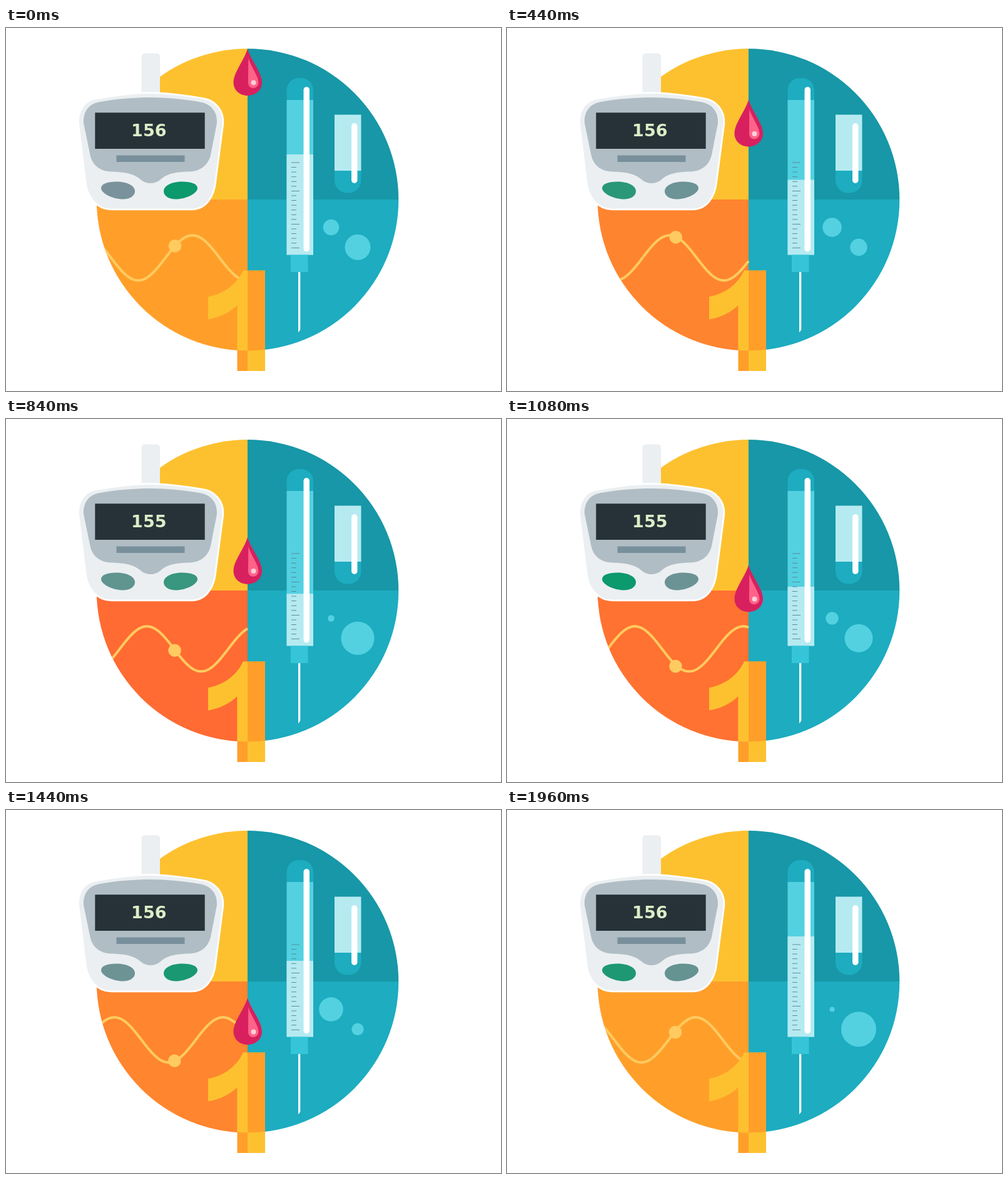
Recreate the animation shown at these times as an HTML page with a canvas. Size 791 by 580 pixels, loop 2000 ms.

```html
<!DOCTYPE html>
<html lang="en">
<head>
<meta charset="utf-8">
<title>Glucose meter</title>
<style>
  html, body { margin: 0; width: 100%; height: 100%; overflow: hidden; background: #fff; }
  canvas { display: block; }
</style>
</head>
<body>
<canvas id="stage" width="791" height="580"></canvas>
<script>
const ctx = document.getElementById('stage').getContext('2d');
const LOOP = 2000, STEP = 40;
const CX = 386, CY = 274.3, R = 241.3;
const YELLOW = '#fdc130', ORANGE = '#ff9f2a', TEAL = '#1797a7', CYAN = '#1dacc0',
      SKY = '#53d1e1', ICE = '#b5eaf1', SHELL = '#ebeff2', GOLD = '#ffcb60';

// Flat lists of time, value pairs
const SMALL = [0, 12.8, 260, 19.8, 600, 11.3, 880, 4.2, 1080, 10.3, 1440, 19.3, 1560, 22.3, 1680, 16.8, 1960, 4];
const BIG = [0, 20.5, 260, 8.6, 600, 18.2, 880, 28, 1080, 22.5, 1440, 9.7, 1560, 5.5, 1680, 11, 1960, 28];
const LEFT_GREEN = [0, 0, 320, 1, 760, 0, 1080, 1, 1490, 0, 1880, 1, 1960, 0.85];
const RIGHT_GREEN = [0, 1, 400, 0, 720, 1, 1015, 0, 1500, 1, 1680, 0.62, 1960, 0.2];
const DOT_SHIFT = [0, 0, 240, 1.5, 600, 0, 1080, 2.3, 1440, -0.5, 1680, 1.2, 1960, 1.5];
const SWING = [0, 0, 880, 1, 1960, 0];
const TOGGLES = [120, 420, 840, 1260, 1560, 1820];

const BODY = new Path2D('M142 114.5C170 110 200 104.8 232 104.8C265 105.5 290 110 313 113.5C334 116 347 133 345.5 153L333.5 245C331 270 318 288 297 288.5L168 288.5C147 288.5 131 270 128.5 247L117 153C116 132 126 118 142 114.5Z');
const FACE = new Path2D('M150 118C178 113 205 111 231 111C258 111 285 114 309 118C328 121 338 134 337 152L327 203C323 219 311 229 293 229.5C270 230 257 233 247 242C238 250 224 250 215 242C205 233 190 230 168 229.5C150 229 138 219 134.5 203L124 152C123 134 132 121 150 118Z');
const BUTTON = new Path2D('M152 256C152 249 162 245.5 176 245.5C194 245.5 206 252 206 261C206 268 198 273.5 187 273.5C170 273.5 152 264 152 256Z');
const ONE = new Path2D('M379 387.5H414V548H369.5V443C357 455 340 463 323 465.5V429.5C353 424 371 405 379 387.5Z');
const DROP = new Path2D('M386 0C381 18 363.5 38 363.5 54C363.5 66 373 75 386 75C399 75 409 66 409 54C409 38 391 18 386 0Z');
const SHINE = new Path2D('M387.3 15C391 28 403.5 44 403.5 54C403.5 60 399 63 394.5 63C390 63 387 59 387 54Z');
const DISC = new Path2D();
DISC.arc(CX, CY, R, 0, Math.PI * 2);

function at(keys, t) {
  for (let i = 2; i < keys.length; i += 2) {
    if (t <= keys[i]) {
      const k = (t - keys[i - 2]) / (keys[i] - keys[i - 2]);
      return keys[i - 1] + (keys[i + 1] - keys[i - 1]) * k;
    }
  }
  return keys[keys.length - 1];
}

function mix(a, b, k) {
  return 'rgb(' + a.map((v, i) => Math.round(v + (b[i] - v) * k)) + ')';
}

function fill(path, color) {
  ctx.fillStyle = color;
  ctx.fill(path);
}

function box(x0, y0, x1, y1, color, radii = 0) {
  ctx.beginPath();
  ctx.roundRect(x0, y0, x1 - x0, y1 - y0, radii);
  ctx.fillStyle = color;
  ctx.fill();
}

function ball(x, y, r, color) {
  ctx.beginPath();
  ctx.arc(x, y, r, 0, Math.PI * 2);
  ctx.fillStyle = color;
  ctx.fill();
}

function clipped(path, draw) {
  ctx.save();
  ctx.clip(path);
  draw();
  ctx.restore();
}

function waveY(x, t) {
  const peak = 298 - 173.4 * t / LOOP;
  return 367.3 - 36 * Math.cos((x - peak) / 173.4 * Math.PI * 2);
}

function drawDisc(t) {
  clipped(DISC, () => {
    box(CX, 0, 791, 274, TEAL);
    box(CX, 274, 791, 580, CYAN);
    box(0, 0, CX, 274, YELLOW);
    box(0, 274, CX, 580, mix([255, 159, 42], [255, 104, 51], at(SWING, t)));
    ctx.beginPath();
    for (let x = 140; x <= CX; x++) ctx.lineTo(x, waveY(x, t));
    ctx.strokeStyle = GOLD;
    ctx.lineWidth = 4;
    ctx.stroke();
  });
  const x = 270 - t / LOOP;
  ball(x, waveY(x, t) + at(DOT_SHIFT, t), 10.3, GOLD);
}

function drawSyringe(t) {
  box(448.5, 80, 491, 116, CYAN, [19, 19, 0, 0]);
  box(448.5, 115, 491, 362.5, SKY);
  box(448.5, 202 + 81 * at(SWING, t), 491, 362.5, ICE);
  for (let i = 0; i < 19; i++) {
    const long = [0, 6, 13, 18].includes(i), y = 215 + i * 7.57;
    box(456, y - 0.45, long ? 469 : 464, y + 0.45, '#607d8b');
  }
  box(475.5, 94, 485, 357.5, '#fff', 4.7);
  box(455, 362.5, 482.5, 390, '#34c5d8');
  fill(new Path2D('M467 390H470.3V482L467 486.5Z'), '#fff');
}

function drawTube(t) {
  box(525, 138.5, 567.5, 228.5, ICE);
  box(525, 228, 567.5, 263.5, CYAN, [0, 0, 20, 20]);
  box(552, 152, 561.5, 248, '#fff', 4.7);
  ball(519.5, 318.5, at(SMALL, t), SKY);
  ball(562, 350.3, at(BIG, t), SKY);
}

function drawDrop(t) {
  const lane = new Path2D();
  lane.rect(350, 0, 80, 430);
  clipped(lane, () => {
    ctx.translate(0, 33 + 0.1855 * t);
    fill(DROP, '#d8205f');
    fill(SHINE, '#ff6389');
    ball(395.5, 54.3, 4, '#ffcfda');
  });
}

function drawOne() {
  clipped(ONE, () => {
    box(300, 380, CX, 580, ORANGE);
    box(CX, 380, 430, 580, YELLOW);
    clipped(DISC, () => {
      box(300, 380, CX, 580, YELLOW);
      box(CX, 380, 430, 580, ORANGE);
    });
  });
}

function drawMeter(t) {
  const gray = [122, 146, 155], green = [12, 153, 107];
  box(216.5, 40.5, 246, 112, SHELL, 5);
  ctx.strokeStyle = '#fff';
  ctx.lineWidth = 5.5;
  ctx.stroke(BODY);
  fill(BODY, SHELL);
  fill(FACE, '#b0bdc4');
  box(142.3, 135.3, 317.7, 193, '#273238');
  box(176.5, 203.5, 285.5, 214, '#78909c');
  fill(BUTTON, mix(gray, green, at(LEFT_GREEN, t)));
  ctx.save();
  ctx.translate(458, 0);
  ctx.scale(-1, 1);
  fill(BUTTON, mix(gray, green, at(RIGHT_GREEN, t)));
  ctx.restore();
  const flips = TOGGLES.filter(v => v <= t).length;
  ctx.font = 'bold 27px "DejaVu Sans", sans-serif';
  ctx.textAlign = 'center';
  ctx.fillStyle = '#dcedc8';
  ctx.fillText(156 - flips % 2, 228.3, 173);
}

function frame(now) {
  const t = Math.floor(now % LOOP / STEP) * STEP;
  ctx.fillStyle = '#fff';
  ctx.fillRect(0, 0, 791, 580);
  drawDisc(t);
  drawSyringe(t);
  drawTube(t);
  drawDrop(t);
  drawOne();
  drawMeter(t);
}

let start;
function tick(now) {
  start ??= now;
  frame(Math.max(0, now - start));
  requestAnimationFrame(tick);
}
frame(0);
requestAnimationFrame(tick);
</script>
</body>
</html>
```
